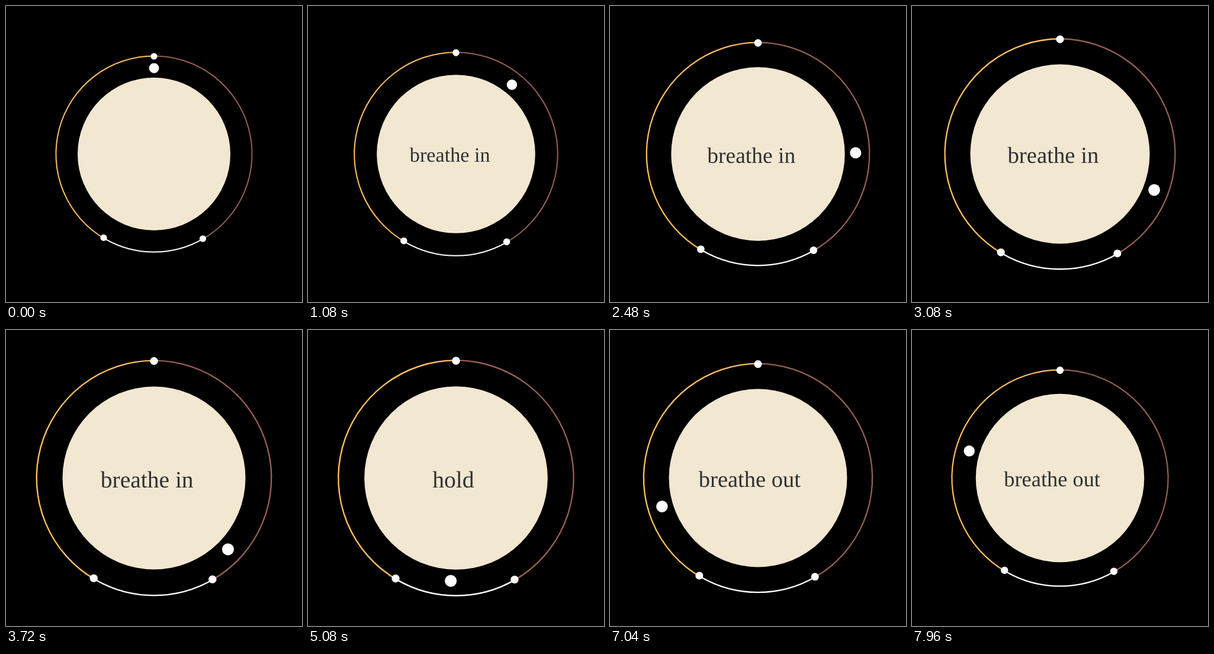
These frames come from a looping animation (500x500 px, 8 s). An HTML page:

```html
<!DOCTYPE html>
<html lang="en">
<head>
<meta charset="utf-8">
<title>Breathing circle</title>
<style>
  html, body { margin: 0; height: 100%; overflow: hidden; background: #000; }
  svg { display: block; width: 100vw; height: 100vh; }
  text { font: 33px "Liberation Serif", "Times New Roman", serif; fill: #303133; text-rendering: geometricPrecision; }
</style>
</head>
<body>
<svg viewBox="-250 -250 500 500">
  <g id="breather">
    <g id="ring" fill="none" stroke-width="2"></g>
    <circle r="129" fill="#f2e7d1"/>
    <text id="label" y="13"></text>
    <g fill="#fff">
      <circle cy="-165" r="5.6"/>
      <circle cx="82.5" cy="143" r="5.6"/>
      <circle cx="-85" cy="141.4" r="5.6"/>
      <circle id="pointer" cy="-145" r="8.4"/>
    </g>
  </g>
</svg>
<script>
const LOOP = 8000, TURN = 10000, BREATH = 4000, HOLD_END = 6000;
const INHALE_LEAD = 25, GROWTH = 0.2, RING_RADIUS = 165.6;
const byId = id => document.getElementById(id);
const breather = byId('breather'), label = byId('label'), pointer = byId('pointer');

// Degrees run clockwise from the top.
function point(degrees) {
  const a = degrees * Math.PI / 180;
  return `${RING_RADIUS * Math.sin(a)} ${-RING_RADIUS * Math.cos(a)}`;
}

function addArc(from, to, color) {
  const path = document.createElementNS('http://www.w3.org/2000/svg', 'path');
  path.setAttribute('d', `M${point(from)}A${RING_RADIUS} ${RING_RADIUS} 0 0 1 ${point(to)}`);
  path.setAttribute('stroke', color);
  byId('ring').append(path);
}

addArc(0, 150, '#945f50');
addArc(150, 210, '#fff');
addArc(210, 360, '#fdbf61');

function ease(x) {
  const u = Math.min(1, Math.max(0, x));
  return u * u * (3 - 2 * u);
}

function cue(t) {
  if (t < 20) return ['', 0];
  if (t < BREATH) return ['breathe in', -75.4];
  if (t < HOLD_END) return ['hold', -33.2];
  return ['breathe out', -85.9];
}

function draw(t) {
  const fullness = ease((t + INHALE_LEAD) / BREATH) - ease((t - HOLD_END) / BREATH);
  const [words, x] = cue(t);
  breather.setAttribute('transform', `scale(${1 + GROWTH * fullness})`);
  pointer.setAttribute('transform', `rotate(${360 * t / TURN})`);
  if (label.textContent !== words) label.textContent = words;
  label.setAttribute('x', x);
}

const start = performance.now();
function tick() {
  draw((performance.now() - start) % LOOP);
  requestAnimationFrame(tick);
}
tick();
</script>
</body>
</html>
```
